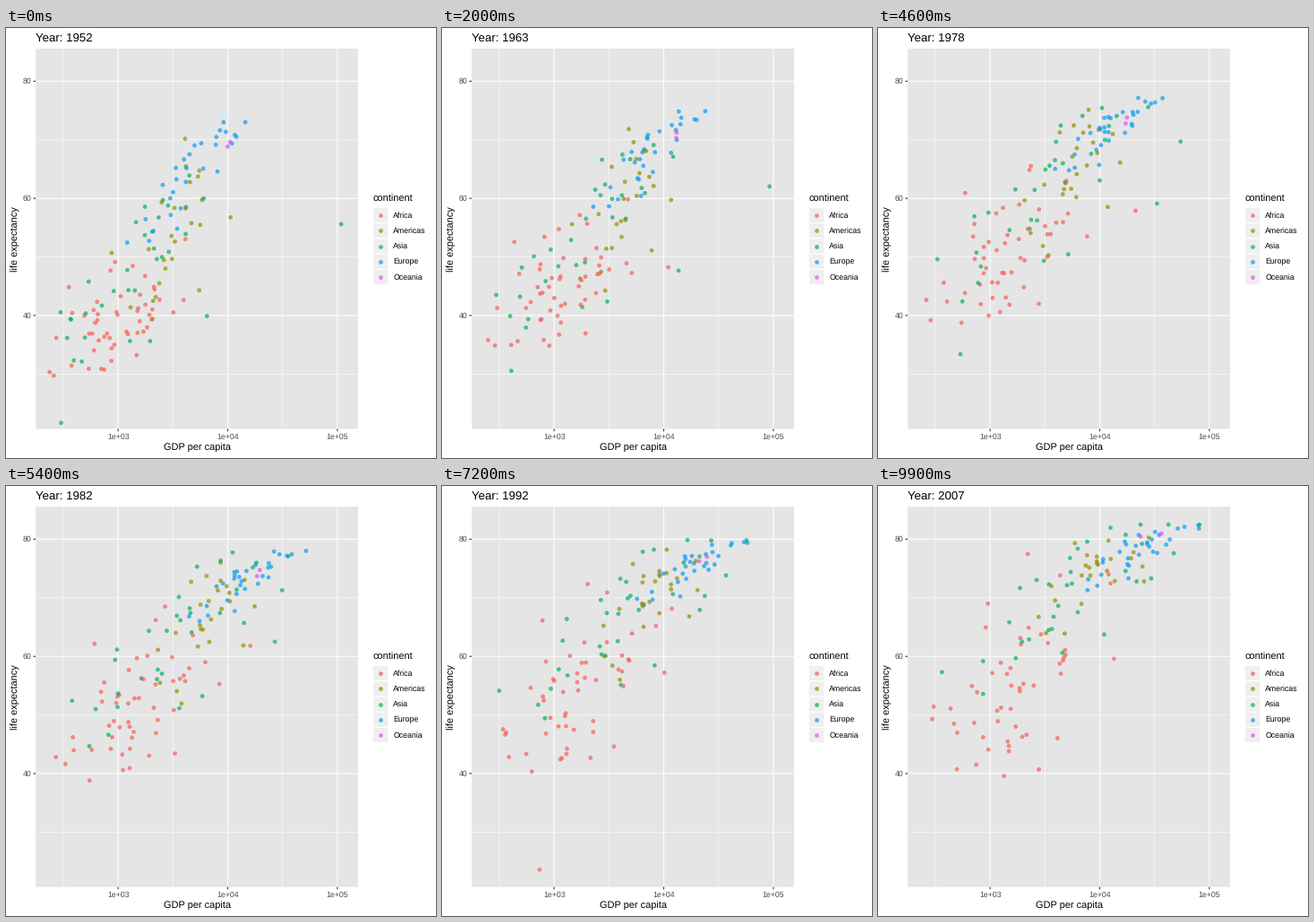
These frames come from a looping animation (480 px wide and 480 px high, 10000 ms). A matplotlib script:

```python
import numpy as np
import matplotlib.pyplot as plt
from matplotlib.animation import FuncAnimation
from matplotlib.patches import Rectangle

FRAMES, STEP = 100, 9            # nine frames between two survey years
SURVEYS = np.arange(1952, 2008, 5)
T = np.linspace(0, 1, len(SURVEYS))
COLORS = {"Africa": "#F75F56", "Americas": "#8F9100", "Asia": "#06AF66",
          "Europe": "#0A9CF4", "Oceania": "#E054F0"}
LEFT, RIGHT, TOP, BOTTOM = 33.2, 393, 23.1, 447.5
ALPHA, DOT = 0.7, 12

rng = np.random.default_rng(12)
xs, ys, colors = [], [], []


def px(v):
    """Pixels to points at 100 dpi."""
    return v * 0.72


def to_x(log_gdp):
    return LEFT + (log_gdp - 2.2487) / 2.94 * (RIGHT - LEFT)


def to_y(life):
    return BOTTOM - (life - 20.649) / 64.904 * (BOTTOM - TOP)


def add(continent, log_gdp, life):
    xs.append(to_x(log_gdp))
    ys.append(to_y(life))
    colors.append(COLORS[continent])


def scores(n):
    """Random values with mean 0 and spread 1."""
    z = rng.normal(size=n)
    return np.clip((z - z.mean()) / z.std(), -2.1, 2.1)


def wander(n, turn):
    """Scores that drift slowly and jitter a little at each survey."""
    a, b = scores(n)[:, None], scores(n)[:, None]
    drift = a * np.cos(turn * T) + b * np.sin(turn * T)
    return drift + rng.normal(0, 0.08, (n, len(T)))


def cloud(continent, n, link, *keys):
    """Keys: log GDP, its spread, life expectancy, its spread in 1952, 1982, 2007."""
    curve = np.polyfit((0, 30 / 55, 1), np.array(keys), 2)
    gdp, gdp_sd, life, life_sd = (np.vander(T, 3) @ curve).T
    wealth, health = wander(n, 0.6), wander(n, 0.9)
    log_gdp = gdp + gdp_sd * wealth
    years = life + life_sd * (link * wealth + np.sqrt(1 - link ** 2) * health)
    ceiling = 73 + 9.5 * T
    years -= np.log1p(np.exp(years - ceiling))
    for pair in zip(log_gdp, years):
        add(continent, *pair)


def detour(continent, *stops):
    """Stops are (year, GDP, life expectancy)."""
    year, gdp, life = np.array(stops).T
    add(continent, np.interp(SURVEYS, year, np.log10(gdp)),
        np.interp(SURVEYS, year, life))


cloud("Africa", 50, 0.4,
      (2.99, 0.29, 39.1, 5.1), (3.16, 0.35, 51.6, 7.3), (3.22, 0.41, 54.8, 9.4))
cloud("Americas", 25, 0.65,
      (3.50, 0.26, 53.3, 9.0), (3.80, 0.25, 66.2, 6.3), (3.95, 0.30, 74.0, 4.2))
cloud("Asia", 30, 0.7,
      (3.10, 0.36, 46.5, 9.2), (3.53, 0.46, 63.0, 8.3), (3.74, 0.49, 71.3, 7.6))
cloud("Europe", 30, 0.8,
      (3.67, 0.27, 64.6, 6.0), (4.16, 0.24, 73.1, 3.1), (4.36, 0.27, 78.2, 3.0))
cloud("Oceania", 2, 0.5,
      (4.01, 0.01, 69.3, 0.3), (4.28, 0.01, 74.3, 0.5), (4.47, 0.07, 80.9, 0.6))

# The few dots that travel far away from their cloud.
detour("Asia", (1952, 108382, 55.6), (1957, 113523, 58), (1967, 80895, 64.6),
       (1972, 109348, 67.7), (1982, 31354, 71.3), (2007, 47307, 77.6))
detour("Asia", (1952, 6460, 39.9), (1972, 24837, 53.9), (1977, 34168, 58.7),
       (1987, 21198, 66.3), (2007, 21655, 72.8))
detour("Asia", (1952, 368, 39.4), (1972, 422, 40.3), (1977, 525, 31.2),
       (1982, 624, 51), (2007, 1714, 59.7))
detour("Africa", (1952, 493, 40), (1982, 882, 46.2), (1992, 737, 23.6),
       (1997, 590, 36.1), (2007, 863, 46.2))
detour("Africa", (1952, 2388, 42.7), (1967, 18773, 50.2), (1977, 21951, 57.4),
       (1987, 11771, 66.2), (2007, 12057, 74))

order = rng.permutation(len(xs))
xs, ys = np.array(xs)[order], np.array(ys)[order]
colors = [colors[i] for i in order]

plt.rcParams["font.family"] = "Liberation Sans"
plt.rcParams["text.hinting"] = "none"
fig = plt.figure(figsize=(4.8, 4.8), dpi=100, facecolor="white")
ax = fig.add_axes([0, 0, 1, 1])
ax.set(xlim=(0, 480), ylim=(480, 0))
ax.axis("off")


def line(x, y, width, color="white"):
    ax.plot(x, y, color=color, lw=px(width), solid_capstyle="butt",
            snap=False, zorder=1)


def box(x, y, w, h, fill, **kw):
    ax.add_patch(Rectangle((x, y), w, h, fc=fill, snap=False, **kw))


def label(x, y, text, size, color="black", **kw):
    kw.setdefault("va", "baseline")
    return ax.text(x, y, text, fontsize=px(size), color=color, **kw)


box(LEFT, TOP, RIGHT - LEFT, BOTTOM - TOP, "#E5E5E5", ec="none", zorder=0)
for v in (2.5, 3.5, 4.5):
    line([to_x(v)] * 2, [TOP, BOTTOM], 0.53)
for v in (30, 50, 70):
    line([LEFT, RIGHT], [to_y(v)] * 2, 0.53)
for v in (3, 4, 5):
    x = to_x(v)
    line([x, x], [TOP, BOTTOM], 1.07)
    line([x, x], [BOTTOM, BOTTOM + 2.75], 1.07, "#333333")
    label(x, 459.3, f"1e+0{v}", 8.8, "#4D4D4D", ha="center")
for v in (40, 60, 80):
    y = to_y(v)
    line([LEFT, RIGHT], [y, y], 1.07)
    line([LEFT - 2.75, LEFT], [y, y], 1.07, "#333333")
    label(28.3, y + 2.7, str(v), 8.8, "#4D4D4D", ha="right")

label(213.1, 472, "GDP per capita", 11, ha="center")
label(15.6, 235.3, "life expectancy", 11, rotation=90, ha="right", va="center")
title = label(33.2, 15, "", 13.2)

label(409.5, 193.6, "continent", 11)
for i, (name, color) in enumerate(COLORS.items()):
    y = 209 + 17.28 * i
    box(409.5, y - 8.64, 17.28, 17.28, "#EFEFEF", ec="white", lw=px(1.07))
    ax.scatter([418.1], [y], s=DOT, c=color, alpha=ALPHA, lw=0, zorder=3)
    label(432.2, y + 2.7, name, 8.8)

dots = ax.scatter(xs[:, 0], ys[:, 0], s=DOT, c=colors, alpha=ALPHA, lw=0, zorder=3)


def draw(k):
    i, f = divmod(k, STEP)
    j = min(i + 1, len(SURVEYS) - 1)
    f /= STEP
    dots.set_offsets(np.column_stack([xs[:, i] * (1 - f) + xs[:, j] * f,
                                      ys[:, i] * (1 - f) + ys[:, j] * f]))
    title.set_text(f"Year: {round(1952 + 55 * k / (FRAMES - 1))}")
    return dots, title


anim = FuncAnimation(fig, draw, frames=FRAMES, interval=100, repeat=True)
plt.show()
```
